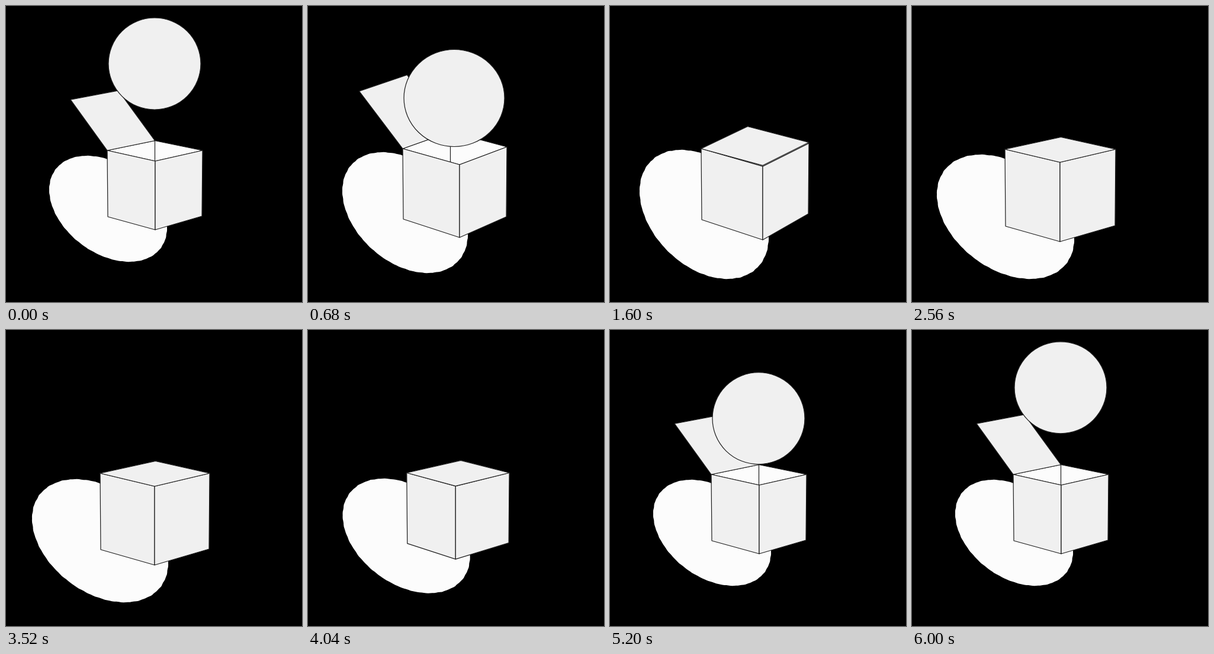
An HTML page with a canvas for the animation above (6.04 s loop, 500 by 500 pixels).

```html
<!DOCTYPE html>
<html lang="en">
<head>
<meta charset="utf-8">
<title>Ball and box</title>
<style>
  html, body { margin: 0; width: 100%; height: 100%; overflow: hidden; background: #000; }
  canvas { display: block; width: 500px; height: 500px; }
</style>
</head>
<body>
<canvas id="stage" width="500" height="500"></canvas>
<script>
const ctx = document.getElementById('stage').getContext('2d');
const LOOP = 6040, STEP = 40;
const FACE = '#f0f0f0', PALE = '#fcfcfc', LINE = '#1c1c1c';

// time, left / front / right rim corners, wall height, shadow left, right, top, bottom
const rows = [
  [0,    171, 244, 252, 262, 332, 244, 112, 73, 272, 253, 432],
  [680,  160, 241, 256, 268, 336, 238, 119, 58, 270, 247, 451],
  [1300, 155, 241, 258, 271, 336, 233, 120, 51, 268, 243, 460],
  [1600, 154, 241, 258, 271, 336, 232, 120, 50, 268, 243, 461],
  [1920, 153, 241, 258, 272, 337, 233, 121, 49, 269, 244, 463],
  [2560, 157, 242, 250, 264, 344, 242, 130, 42, 274, 251, 461],
  [3520, 159, 242, 251, 264, 344, 242, 129, 44, 274, 252, 460],
  [3860, 165, 241, 249, 264, 342, 241, 122, 54, 274, 251, 449],
  [4560, 170, 243, 251, 262, 334, 243, 114, 69, 272, 251, 435]
];
for (const time of [5200, LOOP]) rows.push([time, ...rows[0].slice(1)]);

const clamp = v => Math.min(1, Math.max(0, v));
const smooth = (t, from, to) => {
  const p = clamp((t - from) / (to - from));
  return p * p * (3 - 2 * p);
};

function slope(i, c) {
  if (i < 1 || i >= rows.length - 1) return 0;
  const rate = k => (rows[k + 1][c] - rows[k][c]) / (rows[k + 1][0] - rows[k][0]);
  const a = rate(i - 1), b = rate(i);
  return a * b <= 0 ? 0 : 2 * a * b / (a + b);
}

// Monotone cubic interpolation of every column
function sceneAt(t) {
  let i = 0;
  while (i < rows.length - 2 && rows[i + 1][0] <= t) i++;
  const a = rows[i], b = rows[i + 1], d = b[0] - a[0];
  const p = (t - a[0]) / d, q = 1 - p;
  return a.slice(1).map((v, k) => {
    const c = k + 1;
    return v * (1 + 2 * p) * q * q + b[c] * p * p * (3 - 2 * p) +
      d * p * q * (slope(i, c) * q - slope(i + 1, c) * p);
  });
}

function lidAngle(t) {
  const rest = 0.8 * (1 - smooth(t, 1600, 1960));
  const closing = 140 - (140 - rest) * smooth(t, 840, 1400);
  return (t < 4560 ? closing : 140 * smooth(t, 4560, 4860)) * Math.PI / 180;
}

function ballAt(t) {
  if (t < 1200) {
    const k = 1 - 0.4 * smooth(t, 700, 1000), p = t / 680, z = Math.min(1, p);
    return { x: 251 - 4 * p, y: 97.5 + 58 * p ** 2.7, rx: (78 + 7 * z) * k, ry: (77.5 + 4.5 * z) * k };
  }
  if (t < 4640) return null;
  const k = 0.6 + 0.4 * smooth(t, 4640, 5000);
  const rise = 1 - (1 - clamp((t - 4640) / 1120)) ** 2;
  return { x: 251, y: 315 - 221 * rise + 3.5 * smooth(t, 5760, LOOP), rx: 78 * k, ry: 77.5 * k };
}

function paint(fill) {
  ctx.fillStyle = fill;
  ctx.fill();
  ctx.stroke();
}

function poly(points, fill) {
  ctx.beginPath();
  points.forEach(p => ctx.lineTo(p[0], p[1]));
  ctx.closePath();
  paint(fill);
}

function drawShadow(left, right, top, bottom) {
  const w = (right - left) / 2, h = (bottom - top) / 2, skew = Math.acos(0.36);
  ctx.beginPath();
  for (let i = 0; i < 180; i++) {
    const a = i * Math.PI / 90;
    const r = 1 + 0.004 * Math.sin(a * 37) * Math.sin(a * 11);
    ctx.lineTo(left + w + w * r * Math.cos(a), top + h + h * r * Math.cos(a - skew));
  }
  ctx.fillStyle = PALE;
  ctx.fill();
}

function draw(t) {
  const [lx, ly, fx, fy, rx, ry, h, ...shadow] = sceneAt(t);
  const L = [lx, ly], F = [fx, fy], R = [rx, ry];
  const B = [lx + rx - fx + 0.5, ly + ry - fy + 1.5];
  const floorL = [lx + 1, ly + h], floorF = [fx, fy + h + 4], floorR = [rx - 1, ry + h - 1];
  const angle = lidAngle(t), ball = ballAt(t);
  const swing = (hinge, edge) => [
    hinge[0] + Math.cos(angle) * (edge[0] - hinge[0]),
    hinge[1] + Math.cos(angle) * (edge[1] - hinge[1]) - Math.sin(angle) * h
  ];
  const drawLid = () => poly([L, swing(L, F), swing(B, R), B], FACE);

  ctx.fillStyle = '#000';
  ctx.fillRect(0, 0, 500, 500);
  ctx.strokeStyle = LINE;
  ctx.lineWidth = 1.2;
  ctx.lineJoin = 'round';

  drawShadow(...shadow);
  poly([L, F, R, B], PALE);
  ctx.beginPath();
  ctx.moveTo(...B);
  ctx.lineTo(B[0], fy);
  ctx.stroke();

  const open = angle > Math.PI / 2;
  if (open) drawLid();
  if (ball) {
    ctx.beginPath();
    ctx.ellipse(ball.x, ball.y, ball.rx, ball.ry, 0, 0, Math.PI * 2);
    paint(FACE);
  }
  poly([L, F, floorF, floorL], FACE);
  poly([F, R, floorR, floorF], FACE);
  if (!open) drawLid();
}

const start = performance.now();
function tick() {
  const t = (performance.now() - start) % LOOP;
  draw(Math.floor(t / STEP) * STEP);
  requestAnimationFrame(tick);
}
tick();
</script>
</body>
</html>
```
